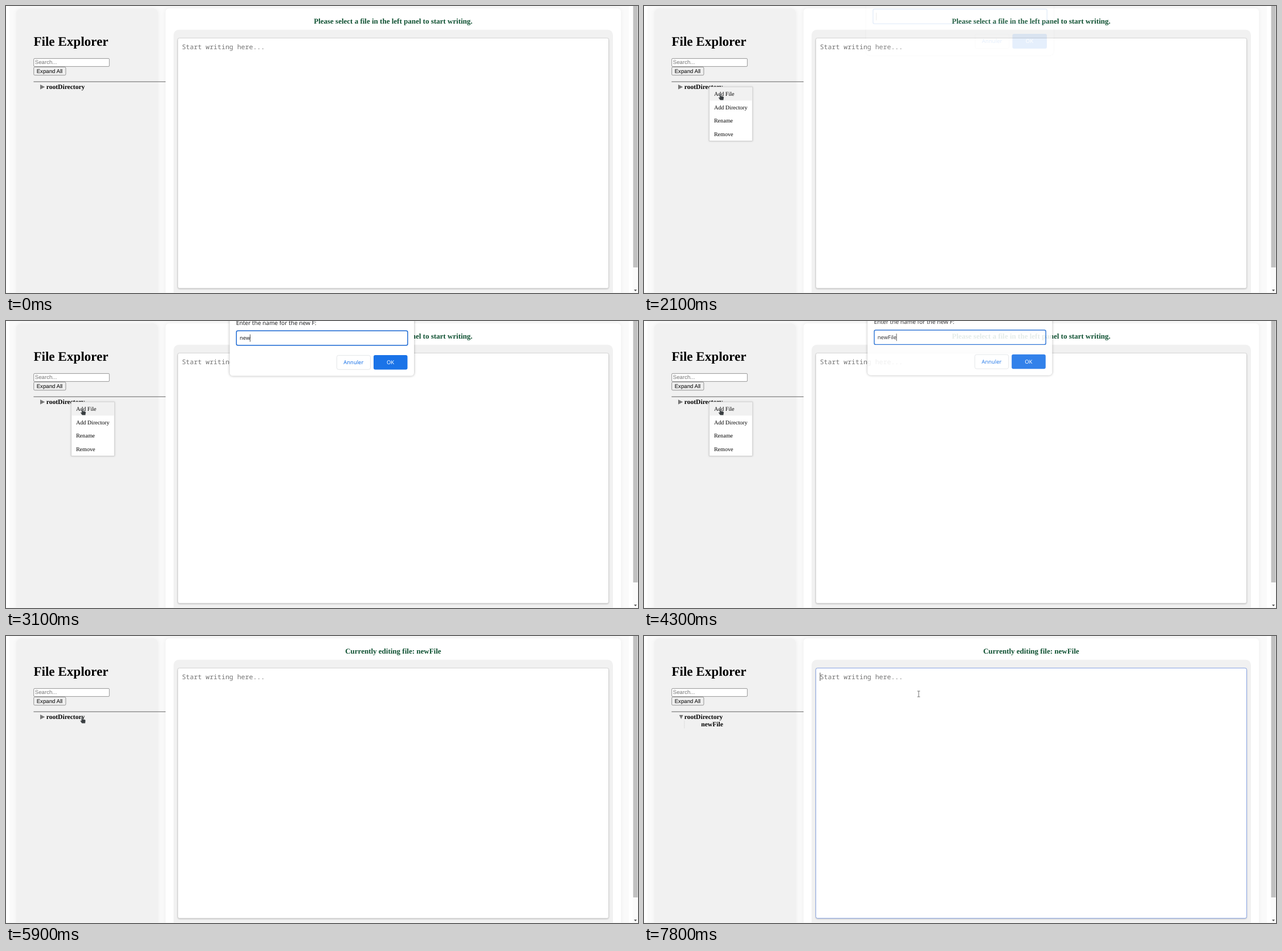
Write an HTML page that moves like this. It is 1109 px wide and 505 px high and loops after 8000 ms.

```html
<!DOCTYPE html>
<html lang="en">
<head>
<meta charset="utf-8">
<title>File Explorer</title>
<style>
  html, body { margin: 0; width: 100%; height: 100%; overflow: hidden; background: #fff; }
  svg { display: block; width: 1109px; height: 505px; }
  text { white-space: pre; text-rendering: geometricPrecision; }
  rect { stroke-width: .75px; }
  .serif { font-family: "Liberation Serif", serif; }
  .bold { font-weight: bold; }
  .node { font-size: 11.55px; }
  .sans { font: 9.63px "Liberation Sans", sans-serif; }
  .mono { font: 11.55px "Noto Sans Mono", monospace; }
  .ui { font: 9.39px "Noto Sans", sans-serif; }
  .ui.label { font-size: 10.11px; }
  .ui.mid { font-weight: 500; }
  .mid { text-anchor: middle; }
  .hint { fill: #757575; }
  .soft { filter: drop-shadow(0 0 3px rgba(0,0,0,.05)); }
  .area { filter: drop-shadow(0 1px 1.2px rgba(0,0,0,.2)); }
  .popup { filter: drop-shadow(0 .7px 1.6px rgba(0,0,0,.2)); }
  .sheet { filter: drop-shadow(0 .7px 2px rgba(0,0,0,.32)); }
  #prompt { transform-origin: 554.5px 0; }
</style>
</head>
<body>
<svg viewBox="0 0 1109 505">
  <rect x="6" y="-5" width="1087" height="520" fill="#fafafa"/>

  <!-- sidebar -->
  <rect class="soft" x="18" y="4.3" width="249" height="520" rx="9" fill="#f1f1f1"/>
  <text class="serif bold" x="48.4" y="70.4" font-size="23.1">File Explorer</text>
  <rect x="48.7" y="92.4" width="132.6" height="14" rx="1.4" fill="#fff" stroke="#767676"/>
  <text class="sans hint" x="50.8" y="102.4">Search...</text>
  <rect x="48.7" y="107.4" width="56.2" height="14.4" rx="2" fill="#efefef" stroke="#767676"/>
  <text class="sans" x="53.7" y="117.6">Expand All</text>
  <rect x="48.4" y="132.7" width="232" height="1.1" fill="#707070"/>
  <path id="closed" d="M60 138.2L68.3 142.5L60 146.8Z" fill="#777"/>
  <path id="open" d="M61.8 139L68.6 139L65.2 146.2Z" fill="#777"/>
  <text class="serif bold node" x="70.8" y="145.8">rootDirectory</text>
  <g id="child">
    <path d="M70.8 149V162.5" stroke="#ccc" stroke-width=".8" stroke-dasharray="1 .6"/>
    <text class="serif bold node" x="100.3" y="159.2">newFile</text>
  </g>

  <!-- editor -->
  <rect class="soft" x="280" y="4.3" width="799" height="520" rx="6" fill="#fff"/>
  <text id="title" class="serif bold mid" x="679.4" y="30.8" font-size="13" fill="#0f5132"></text>
  <rect x="294" y="41.8" width="771" height="480" rx="9" fill="#f1f1f1"/>
  <rect class="area" x="301.5" y="56.4" width="756" height="440.3" rx="3" fill="#fff" stroke="#ccc"/>
  <rect id="focus" x="301.5" y="56.4" width="756" height="440.3" rx="3" fill="none" stroke="#7398ee"/>
  <text class="mono hint" x="308.7" y="76">Start writing here...</text>
  <rect id="areaCaret" x="308.6" y="64.5" width=".8" height="14.5" fill="#222"/>

  <!-- scrollbar -->
  <rect x="1100" width="9" height="505" fill="#fbfbfb"/>
  <rect x="1100.5" width="8" height="460" fill="#c1c1c1"/>
  <path d="M1102 499H1107L1104.5 502Z" fill="#505050"/>
  <rect y="504.2" width="1109" height=".8" fill="#f5f5f5"/>

  <!-- context menu, items added by script -->
  <g id="menu" class="serif" font-size="10.11">
    <rect class="popup" x="114.4" y="142.4" width="75.8" height="95" fill="#fff" stroke="#ccc"/>
    <rect id="hover" x="114.8" y="142.8" width="75" height="23.6" fill="#f1f1f1"/>
  </g>

  <!-- prompt -->
  <g id="prompt">
    <rect class="sheet" x="392.5" y="-40" width="323.5" height="136.6" rx="5.5" fill="#fff"/>
    <text class="ui label" x="403.8" y="6.6" fill="#202124">Enter the name for the new F:</text>
    <rect x="404.3" y="17.3" width="300.5" height="25.4" rx="2.5" fill="#fff" stroke="#1967d2" style="stroke-width:1.45px"/>
    <text id="typed" class="ui" x="410" y="33.2" fill="#202124"></text>
    <rect id="caret" y="23.5" width=".8" height="13" fill="#222"/>
    <rect x="580.5" y="60.4" width="59" height="24.9" rx="3" fill="#fff" stroke="#dadce0"/>
    <text class="ui mid" x="609.8" y="76.2" fill="#1a73e8">Annuler</text>
    <rect x="645" y="60.1" width="59.5" height="25.5" rx="3" fill="#1a73e8"/>
    <text class="ui mid" x="674.5" y="76.2" fill="#fff">OK</text>
  </g>

  <!-- pointers, hot spot at 0,0 -->
  <g id="pointer">
    <path id="arrow" d="M0 0V10.2L2.3 8.2L4.2 12.2L5.8 11.4L4 7.6H7Z" fill="#3d4043" stroke="#fff" stroke-width=".5"/>
    <path id="hand" d="M-1.3 1Q-1.3 -.1 -.2 -.1Q.9 -.1 .9 1V4.2L4.7 5Q6.3 5.4 6.2 7L5.5 11.8H-.2Q-2 9.6 -3.3 7.2Q-3.1 5.8 -1.3 7.2Z" fill="#3a3f42" stroke="#fff" stroke-width=".4"/>
    <path id="beam" d="M-2.4 -5H2.4M0 -5V5M-2.4 5H2.4" fill="none" stroke="#666" stroke-width=".9"/>
  </g>
</svg>
<script>
  const el = Object.fromEntries([...document.querySelectorAll('[id]')].map(e => [e.id, e]));
  const LOOP = 8000, STEP = 100;

  const clamp = v => Math.min(1, Math.max(0, v));
  const ease = v => (v = clamp(v), v * v * (3 - 2 * v));
  const within = (v, a, b) => v >= a && v < b;
  const show = (e, on) => e.setAttribute('visibility', on ? 'inherit' : 'hidden');

  ['Add File', 'Add Directory', 'Rename', 'Remove'].forEach((name, i) => {
    const item = document.createElementNS('http://www.w3.org/2000/svg', 'text');
    item.setAttribute('x', 122.9);
    item.setAttribute('y', 158 + 23.67 * i);
    item.textContent = name;
    el.menu.append(item);
  });

  // stops of the pointer and when it travels to each
  const start = { x: 235, y: 27 };
  const moves = [
    { from: 400, to: 500, x: 161, y: 62.5 },    // heading
    { from: 600, to: 1200, x: 114, y: 142 },    // root node
    { from: 1400, to: 1900, x: 134, y: 154 },   // "Add File"
    { from: 4800, to: 5300, x: 389, y: 130.5 }, // editor
    { from: 5400, to: 5900, x: 133.5, y: 142 }, // root node
    { from: 6200, to: 6900, x: 114, y: 159.5 }, // new file
    { from: 7100, to: 7500, x: 482, y: 102 }    // editor
  ];

  function position(t) {
    let { x, y } = start;
    for (const m of moves) {
      const k = ease((t - m.from) / (m.to - m.from));
      x += (m.x - x) * k;
      y += (m.y - y) * k;
    }
    return [x, y];
  }

  function pointerKind(t, x, y) {
    if (within(t, 1500, 4500)) return 'hand';
    if (x > 302 && y > 56 || within(x, 48, 182) && within(y, 92, 107)) return 'beam';
    const treeEnd = t >= 6200 ? 163.5 : 149;
    return x < 140 && within(y, 136, treeEnd) ? 'hand' : 'arrow';
  }

  // typing comes in two bursts: "new", then "File"
  const typedCount = t => t < 3500
    ? Math.min(3, Math.ceil((t - 2700) / 130))
    : Math.min(7, 4 + Math.floor((t - 3500) / 165));

  function draw(t) {
    const [x, y] = position(t), kind = pointerKind(t, x, y);
    show(el.pointer, t >= moves[0].from);
    el.pointer.setAttribute('transform', `translate(${x} ${y})`);
    for (const k of ['arrow', 'hand', 'beam']) show(el[k], k === kind);

    show(el.menu, within(t, 1500, 4400));
    show(el.hover, y > 143);

    const alpha = ease(Math.min(t - 2050, 4500 - t) / 250), away = 1 - alpha;
    show(el.prompt, alpha > 0);
    el.prompt.style.opacity = alpha;
    el.prompt.style.transform = `translateY(${-13.4 * away}px) scale(${1 + .018 * away})`;
    el.typed.textContent = 'newFile'.slice(0, Math.max(0, typedCount(t)));
    el.caret.setAttribute('x', 409.6 + el.typed.getComputedTextLength());
    show(el.caret, !within(t, 2600, 2800));

    el.title.textContent = t < 4400
      ? 'Please select a file in the left panel to start writing.'
      : 'Currently editing file: newFile';

    const open = t >= 6200;
    show(el.closed, !open);
    show(el.open, open);
    show(el.child, open);

    el.focus.style.opacity = clamp((t - 7500) / 300);
    show(el.areaCaret, t >= 7600);
  }

  function tick() {
    draw(Math.floor(performance.now() % LOOP / STEP) * STEP);
    requestAnimationFrame(tick);
  }
  tick();
</script>
</body>
</html>
```
